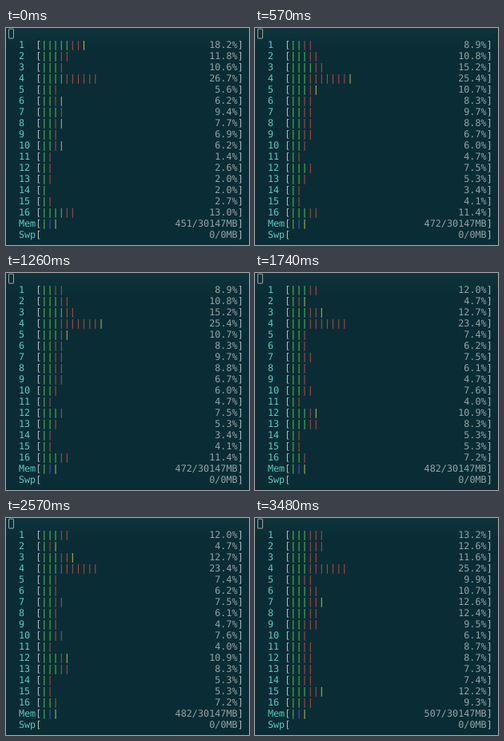
Recreate the animation shown at these times as an HTML page. Size 304 by 272 pixels, loop 3530 ms.

```html
<!DOCTYPE html>
<html lang="en">
<head>
<meta charset="utf-8">
<title>CPU meters</title>
<style>
  html, body { margin: 0; width: 100%; height: 100%; overflow: hidden; background: #0a2d35; }
  svg { display: block; width: 304px; height: 272px; }
  text { font: 11.8px "DejaVu Sans Mono", monospace; white-space: pre; fill: #94a2a4; text-rendering: geometricPrecision; }
  .caption { fill: #5cc9c4; }
  .bracket { fill: #b0bcbc; }
  .G { fill: #52c44c; }
  .R { fill: #b8493f; }
  .Y { fill: #bdbb4b; }
  .B { fill: #4a55cf; }
</style>
</head>
<body>
<svg id="screen" viewBox="0 0 304 272">
  <defs>
    <linearGradient id="glow" x2="0" y2="1">
      <stop offset="0" stop-color="#0e3339"/>
      <stop offset=".1" stop-color="#0a2d35"/>
    </linearGradient>
  </defs>
  <rect width="304" height="272" fill="url(#glow)"/>
  <rect x="3.5" y="1.2" width="6" height="11.8" rx=".5" fill="none" stroke="#9aa5a5"/>
</svg>
<script>
const LOOP = 3530;
const ROW = 14, BASELINE = 25, LEFT = 1.7, RIGHT = 296.8;

// Each reading: start time, used memory, then "load bars" for every core.
// Bars: G user, R kernel, Y and B the remaining shares.
const readings = [
  { at: 0, mem: 451, cores:
    '18.2 GGGGGRRY,11.8 GGGRR,10.6 GGGR,26.7 GGGGRRRRRR,5.6 GGR,6.2 GGRY,9.4 GGGR,7.7 GGRY,' +
    '6.9 GGR,6.2 GGRY,1.4 GR,2.6 GR,2.0 GR,2.0 G,2.7 GR,13.0 GGGGRR' },
  { at: 90, mem: 472, cores:
    '8.9 GGRR,10.8 GGGRR,15.2 GGGGRR,25.4 GGGRRRRRRRY,10.7 GGGRY,8.3 GGRR,9.7 GGRR,8.8 GGRR,' +
    '6.7 GGRR,6.0 GGR,4.7 GR,7.5 GGGR,5.3 GGR,3.4 GR,4.1 GR,11.4 GGGRR' },
  { at: 1740, mem: 482, cores:
    '12.0 GGGRR,4.7 GRY,12.7 GGGRRY,23.4 GGGRRRRRRR,7.4 GGR,6.2 GGR,7.5 GGRR,6.1 GGR,' +
    '4.7 GGR,7.6 GGRR,4.0 GR,10.9 GGGRY,8.3 GGGRR,5.3 GR,5.3 GR,7.2 GGR' },
  { at: 3480, mem: 507, cores:
    '13.2 GGGRRR,12.6 GGGRRR,11.6 GGGRR,25.2 GGGRRRRRRR,9.9 GGRR,10.7 GGGRR,12.6 GGGRRY,12.4 GGGRR,' +
    '9.5 GGRRR,6.1 GGR,8.7 GGRR,8.7 GGRR,7.3 GGRR,7.4 GGRR,12.2 GGGRRY,9.3 GGRR' }
];

const screen = document.getElementById('screen');
const NS = 'http://www.w3.org/2000/svg';

function add(parent, tag, attrs, content = '') {
  const node = document.createElementNS(NS, tag);
  for (const key in attrs) node.setAttribute(key, attrs[key]);
  node.textContent = content;
  return parent.appendChild(node);
}

function span(parent, cls, content) {
  return add(parent, 'tspan', { class: cls }, content);
}

function makeMeter(caption, row) {
  const y = BASELINE + row * ROW;
  const left = add(screen, 'text', { x: LEFT, y });
  span(left, 'caption', '  ' + caption.padEnd(3));
  span(left, 'bracket', '[');
  const bars = span(left, '');
  const right = add(screen, 'text', { x: RIGHT, y, 'text-anchor': 'end' });
  const value = span(right, '');
  span(right, 'bracket', ']');
  return { bars, value };
}

const captions = [...Array.from({ length: 16 }, (_, i) => String(i + 1)), 'Mem', 'Swp'];
const meters = captions.map(makeMeter);

function setMeter({ bars, value }, label, colors) {
  value.textContent = label;
  bars.textContent = '';
  for (const color of colors) span(bars, color, '|');
}

let shown;

function render(time) {
  const reading = readings.findLast(r => r.at <= time);
  if (reading === shown) return;
  shown = reading;
  reading.cores.split(',').forEach((core, i) => {
    const [load, colors] = core.split(' ');
    setMeter(meters[i], load + '%', colors);
  });
  setMeter(meters[16], reading.mem + '/30147MB', 'GBY');
  setMeter(meters[17], '0/0MB', '');
}

const start = performance.now();

function tick() {
  render((performance.now() - start) % LOOP);
  requestAnimationFrame(tick);
}
tick();
</script>
</body>
</html>
```
